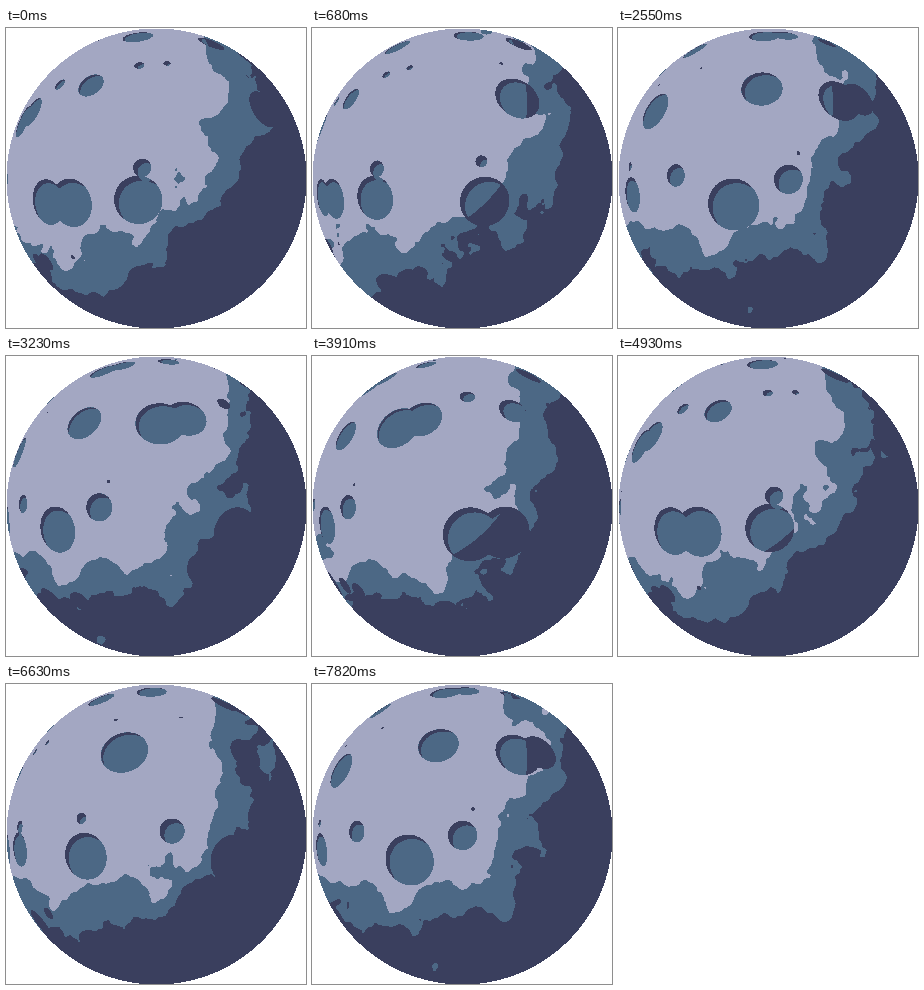
These frames come from a looping animation (300 by 300 pixels, 7.99 s). An HTML page with a canvas:

```html
<!DOCTYPE html>
<html lang="en">
<head>
<meta charset="utf-8">
<title>Rotating moon</title>
<style>
  html, body { margin: 0; width: 100%; height: 100%; overflow: hidden; background: #fff; }
  canvas { display: block; width: 100%; height: 100%; image-rendering: pixelated; }
</style>
</head>
<body>
<canvas id="moon" width="300" height="300"></canvas>
<script>
const SIZE = 300, STEP_MS = 170, LOOP_MS = 7990, TURN_STEPS = 30;
const SEED = 7.28, LIGHT = 0.25;
const GROUND = 8, CRATERS = 5, OCTAVES = 4;
const MID_EDGE = 0.618, DARK_EDGE = 0.732, CRATER_EDGE = 0.465;
const SHADOW = (LIGHT - 0.5) * 0.03 * CRATERS;

// Pixel colours as little-endian ABGR
const PALE = 0xffc2a7a3, MID = 0xff85684c, DARK = 0xff5e3f3a, PAPER = 0xffffffff;

const ctx = document.getElementById('moon').getContext('2d');
const fract = v => v - Math.floor(v);

// Table of hashed values that tiles every n cells
function lattice(n) {
  const cells = new Float64Array(n * n);
  for (let y = 0; y < n; y++)
    for (let x = 0; x < n; x++)
      cells[y * n + x] = fract(Math.sin(x * 12.9898 + y * 78.233) * 15.5453 * SEED);
  return (x, y) => cells[(y % n) * n + x % n];
}
const groundHash = lattice(GROUND), craterHash = lattice(CRATERS);

function noise(x, y) {
  const ix = Math.floor(x), iy = Math.floor(y);
  let fx = x - ix, fy = y - iy;
  fx *= fx * (3 - 2 * fx);
  fy *= fy * (3 - 2 * fy);
  const a = groundHash(ix, iy), b = groundHash(ix + 1, iy);
  const c = groundHash(ix, iy + 1), d = groundHash(ix + 1, iy + 1);
  const top = a + (b - a) * fx, bottom = c + (d - c) * fx;
  return top + (bottom - top) * fy;
}

function fbm(x, y) {
  let sum = 0, scale = 0.5;
  for (let i = 0; i < OCTAVES; i++) {
    sum += noise(x, y) * scale;
    x *= 2; y *= 2; scale /= 2;
  }
  return sum;
}

// 0 inside a cell's circle, 1 outside
function circle(x, y) {
  const row = Math.floor(y);
  x += row * 0.31;
  const col = Math.floor(x);
  const h = craterHash(col, row), r = h * 0.25, mid = 0.25 + h * 0.5;
  const m = Math.hypot(x - col - mid, y - row - mid);
  if (m >= r) return 1;
  const k = Math.max(0, (m - 0.9 * r) / (0.1 * r));
  return k * k * (3 - 2 * k);
}

const crater = (x, y) => 1 - circle(x + 11, y + 11) * circle(x + 12, y + 12);

// Everything about a pixel that does not change with time
const pixels = [];
for (let py = 0; py < SIZE; py++) {
  for (let px = 0; px < SIZE; px++) {
    const u = px / SIZE, v = py / SIZE;
    const x = u * 2 - 1, y = v * 2 - 1, rr = x * x + y * y;
    if (rr >= 0.9999) continue;
    const z = Math.sqrt(1 - rr), warp = fbm(u, v);
    pixels.push({
      at: py * SIZE + px,
      light: Math.hypot(u - LIGHT, v - LIGHT),
      gx: u * GROUND + warp,
      gy: v * GROUND + warp,
      cx: (x / (z + 1) + 1) / 2 * CRATERS,
      cy: (y / (z + 1) + 1) / 2 * CRATERS
    });
  }
}

function shade(p, turn) {
  const x = p.cx + turn * CRATERS;
  const c = crater(x, p.cy);
  if (c >= 0.5) {
    const lit = crater(x + SHADOW, p.cy + SHADOW);
    return p.light > CRATER_EDGE || lit < c - (0.5 - p.light) * 2 ? DARK : MID;
  }
  const d = p.light + 0.3 * fbm(p.gx + turn * GROUND, p.gy);
  return d > DARK_EDGE ? DARK : d > MID_EDGE ? MID : PALE;
}

function render(step) {
  const image = ctx.createImageData(SIZE, SIZE);
  const out = new Uint32Array(image.data.buffer).fill(PAPER);
  for (const p of pixels) out[p.at] = shade(p, step / TURN_STEPS);
  return image;
}

const views = [];
let shown = -1;

function draw() {
  const step = Math.floor(performance.now() % LOOP_MS / STEP_MS) % TURN_STEPS;
  if (step !== shown) {
    views[step] = views[step] || render(step);
    ctx.putImageData(views[step], 0, 0);
    shown = step;
  }
  requestAnimationFrame(draw);
}
draw();
</script>
</body>
</html>
```
